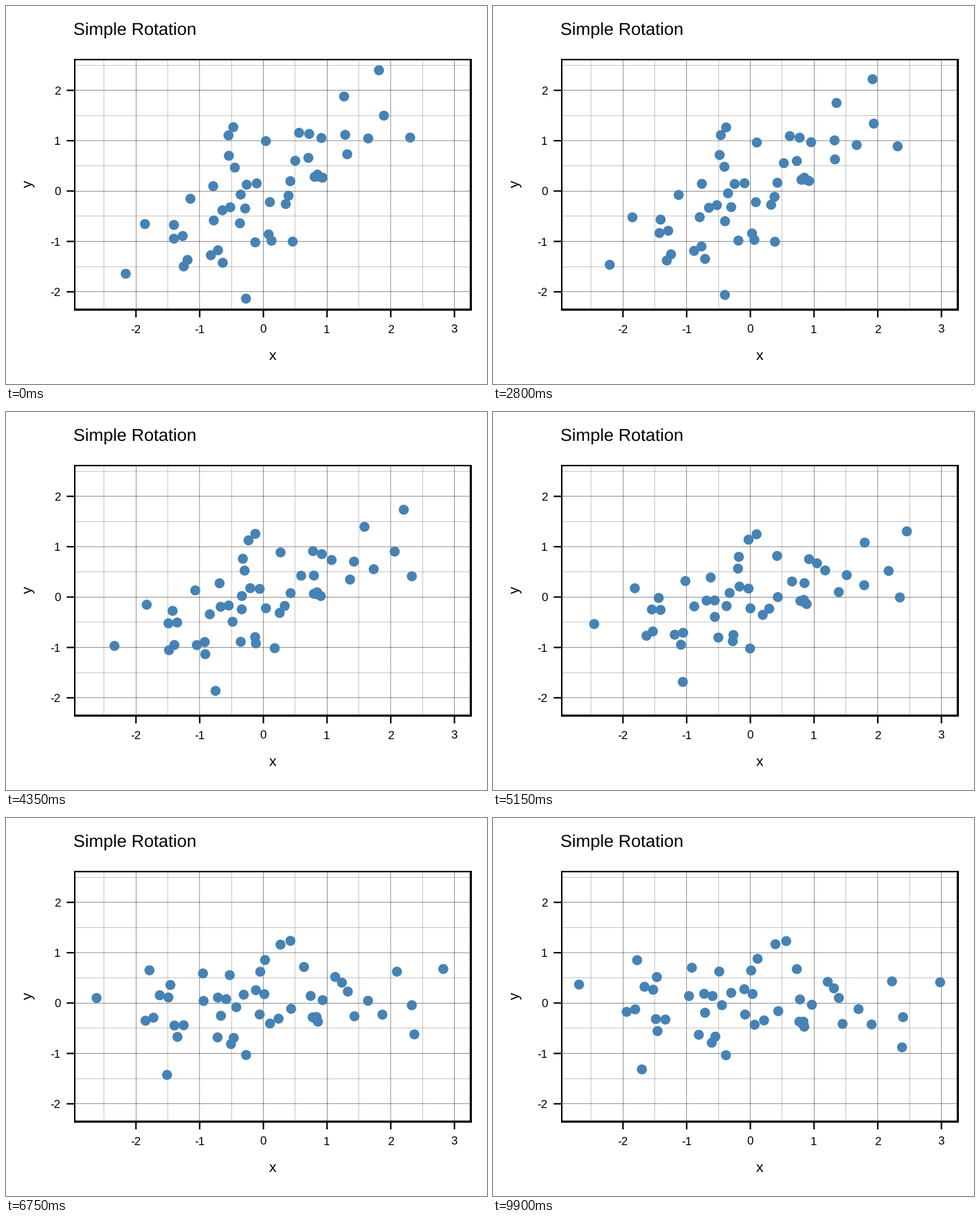
Recreate the animation shown at these times as a matplotlib script. Size 700 by 550 pixels, loop 10000 ms.

```python
import math

import numpy as np
import matplotlib.pyplot as plt
from matplotlib.animation import FuncAnimation

W, H, DPI = 700, 550, 100
FRAMES, INTERVAL = 200, 50
LEFT, RIGHT, TOP, BOTTOM = 99, 677, 76.9, 442.4   # panel edges in pixels
BORDER, TICK, DOT = 2.13, 10.67, 14.6

plt.rcParams["font.family"] = "Liberation Sans"
plt.rcParams["text.hinting"] = "none"


def r_normals(seed, n):
    """Normal draws as R gives them: Mersenne Twister with inversion."""
    key = []
    for _ in range(50 + 625):
        seed = (69069 * seed + 1) % 2 ** 32
        key.append(seed)
    rng = np.random.RandomState()
    rng.set_state(("MT19937", np.array(key[-624:], dtype=np.uint32), 624))
    z = np.linspace(-5, 5, 10001)
    cdf = [0.5 + 0.5 * math.erf(v / math.sqrt(2)) for v in z]
    return np.interp(rng.random_sample(n), cdf, z)


def scale(a):
    return (a - a.mean()) / a.std(ddof=1)


def correlated(x, y, r):
    """Standardise both and give them a sample correlation of exactly r."""
    x, y = scale(x), scale(y)
    noise = scale(y - x * (x @ y) / (x @ x))
    return np.column_stack([x, r * x + math.sqrt(1 - r * r) * noise])


def padded(values):
    lo, hi = values.min(), values.max()
    pad = 0.05 * (hi - lo)
    return lo - pad, hi + pad


start = correlated(*r_normals(123, 100).reshape(2, 50), r=0.7)
c = math.sqrt(0.5)
end = start @ np.array([[c, -c], [c, c]])   # clockwise turn by 45 degrees

both = np.vstack([start, end])
x_lim, y_lim = padded(both[:, 0]), padded(both[:, 1])


def to_px(x):
    return np.interp(x, x_lim, (LEFT, RIGHT))


def to_py(y):
    return np.interp(y, y_lim, (BOTTOM, TOP))


def pixels(points):
    return np.column_stack([to_px(points[:, 0]), to_py(points[:, 1])])


def pt(px):
    return px * 72 / DPI


fig = plt.figure(figsize=(W / DPI, H / DPI), dpi=DPI, facecolor="white")
ax = fig.add_axes([0, 0, 1, 1])
ax.set_xlim(0, W)
ax.set_ylim(H, 0)
ax.set_axis_off()


def label(x, y, text, size, ha="center", **kw):
    ax.text(x, y, text, fontsize=pt(size), ha=ha, va="baseline", **kw)


def line(xs, ys, width):
    ax.plot(xs, ys, color="black", lw=pt(width), solid_capstyle="butt",
            snap=False, zorder=2)


def box(x0, y0, x1, y1, color):
    ax.add_patch(plt.Rectangle((x0, y0), x1 - x0, y1 - y0, color=color, lw=0,
                               snap=False, zorder=1))


# The panel border is one pixel heavier on the right and at the bottom.
box(LEFT, TOP, RIGHT + 1, BOTTOM + 1, "black")
box(LEFT + BORDER, TOP + BORDER, RIGHT - BORDER, BOTTOM - BORDER, "white")

for half in range(-5, 7):
    v = half / 2
    major = half % 2 == 0
    width = 0.43 if major else 0.22
    x, y = to_px(v), to_py(v)
    in_y = y_lim[0] < v < y_lim[1]
    line((x, x), (TOP, BOTTOM), width)
    if in_y:
        line((LEFT, RIGHT), (y, y), width)
    if major:
        line((x, x), (BOTTOM, BOTTOM + TICK), BORDER)
        label(x - 0.4, 476, str(half // 2), 17.07)
        if in_y:
            line((LEFT - TICK, LEFT), (y, y), BORDER)
            label(79.3, y + 6.2, str(half // 2), 17.07, ha="right")

label(LEFT - 0.5, 42, "Simple Rotation", 25.4, ha="left")
label((LEFT + RIGHT) / 2, 515, "x", 21.33)
label(38, (TOP + BOTTOM) / 2 - 0.6, "y", 21.33, rotation=90, rotation_mode="anchor")

# One size per dot keeps the centres from being rounded to whole pixels.
dots = ax.scatter(*pixels(start).T, s=np.full(len(start), pt(DOT) ** 2),
                  color="steelblue", linewidths=0, zorder=3)


def ease(t):
    return 4 * t ** 3 if t < 0.5 else 1 - 4 * (1 - t) ** 3


def update(i):
    dots.set_offsets(pixels(start + (end - start) * ease(i / (FRAMES - 1))))
    return (dots,)


anim = FuncAnimation(fig, update, frames=FRAMES, interval=INTERVAL,
                     repeat=True, repeat_delay=0)
plt.show()
```
